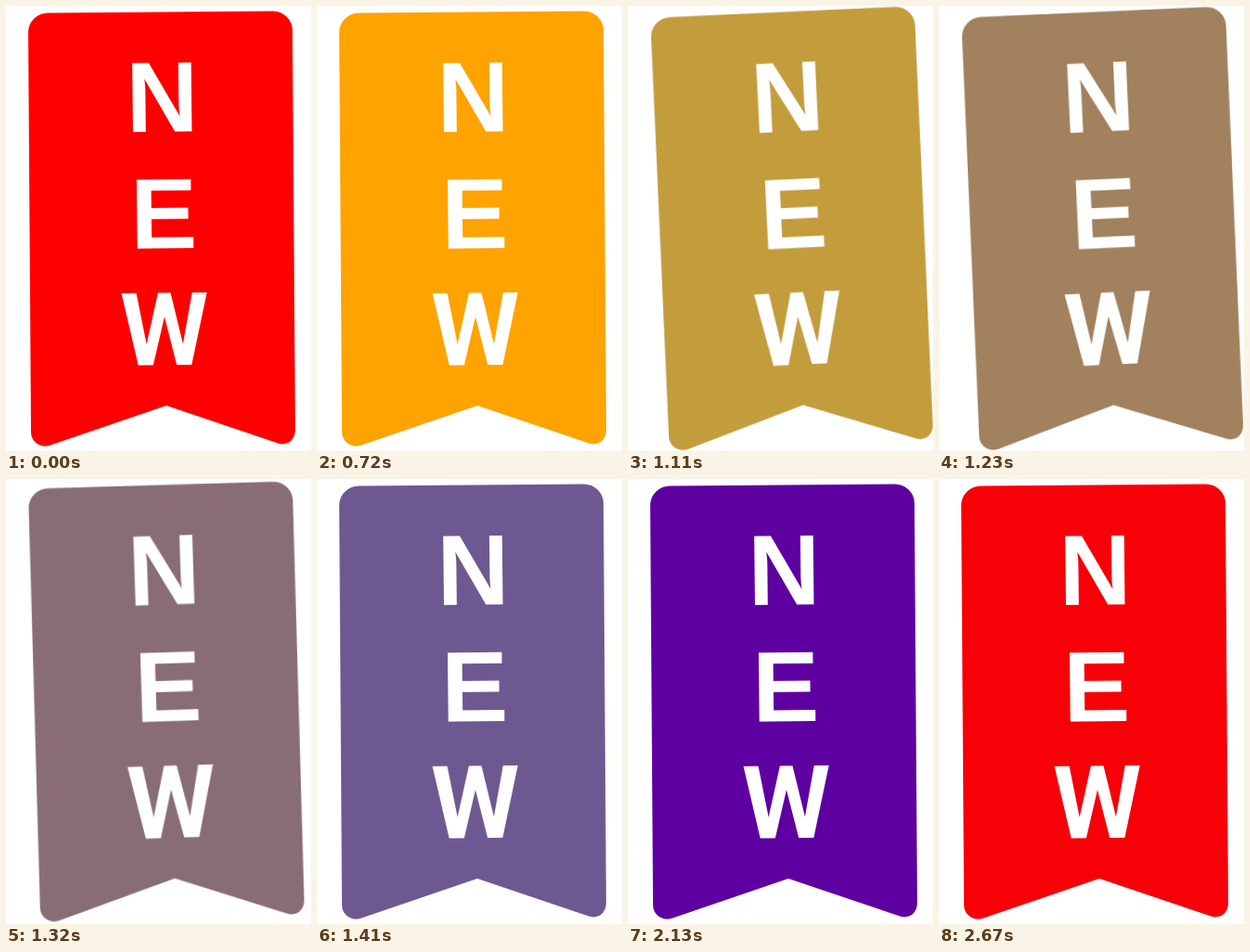
An HTML page without scripts that plays this animation: 329x480 px, repeating every 2.7 s.

```html
<!DOCTYPE html>
<html lang="en">
<head>
<meta charset="utf-8">
<title>New ribbon</title>
<style>
  html, body { margin: 0; width: 100%; height: 100%; overflow: hidden; background: #fff; }
  svg { display: block; width: 329px; height: 480px; }

  .ribbon {
    transform-origin: 166px 5px;
    animation: swing 2700ms infinite;
  }
  .cloth { animation: tint 2700ms linear infinite; }

  text {
    fill: #fff;
    text-anchor: middle;
    font: bold 108px "Liberation Sans", Arial, sans-serif;
  }
  .wide { font: bold 109.5px Roboto, sans-serif; }

  @keyframes tint {
    0%, 100% { fill: #f00; }
    33.333% { fill: #fc0; }
    66.667% { fill: #00f; }
  }

  @keyframes swing {
    0%, 26.67% { transform: rotate(0deg); animation-timing-function: ease-in-out; }
    30.93% { transform: rotate(3.6deg); animation-timing-function: ease; }
    43.33% { transform: rotate(-2.25deg); animation-timing-function: ease-in; }
    56.67% { transform: rotate(2.14deg); animation-timing-function: ease-in-out; }
    60%, 100% { transform: rotate(0deg); }
  }
</style>
</head>
<body>
<svg viewBox="0 0 329 480">
  <g class="ribbon">
    <path class="cloth" d="M24 28A21 21 0 0 1 45 7.5L288 5.5A21 21 0 0 1 309 26L312 457C312 468 304 475 293 471.5L173 431L47 474C37 477 27 470 27 460Z"/>
    <text transform="translate(168.8 135.7) rotate(-.6)">N</text>
    <text transform="translate(170.5 261.4) rotate(-.6)">E</text>
    <text class="wide" transform="translate(171.5 387.2) rotate(-.6)">W</text>
  </g>
</svg>
</body>
</html>
```
